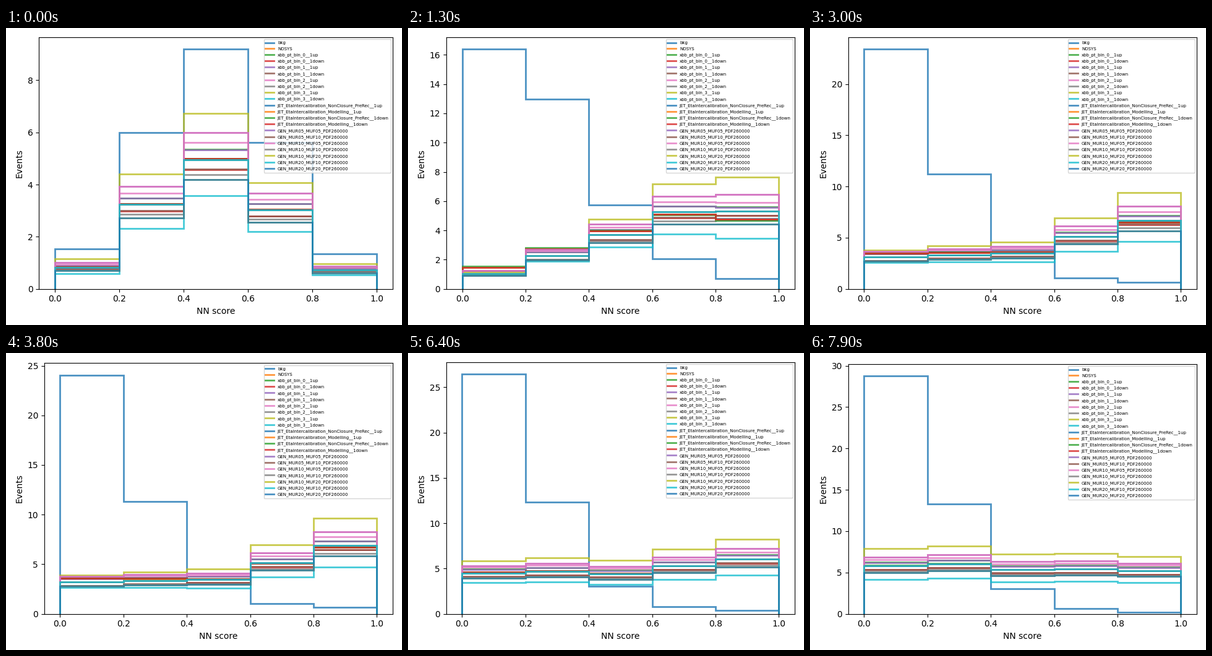
These frames come from a looping animation (640x480 px, 8 s). A matplotlib script:

```python
import numpy as np
import matplotlib.pyplot as plt
from matplotlib.animation import FuncAnimation

FRAMES, STEP_MS = 80, 100
EDGES = np.linspace(0, 1, 6)
POS = np.linspace(0, 1, 5)

LABELS = ["bkg", "NOSYS"]
LABELS += [f"xbb_pt_bin_{i}__1{d}" for i in range(4) for d in ("up", "down")]
LABELS += [f"JET_EtaIntercalibration_{n}__1{d}"
           for d in ("up", "down") for n in ("NonClosure_PreRec", "Modelling")]
SCALES = [("05", "05"), ("05", "10"), ("10", "05"), ("10", "10"),
          ("10", "20"), ("20", "10"), ("20", "20")]
LABELS += [f"GEN_MUR{r}_MUF{f}_PDF260000" for r, f in SCALES]

# Untrained network: background and signal share one bell
BELL = np.array([0.835, 3.24, 4.96, 3.03, 0.73])


def linear(u):
    return u


def ease_in(u):
    return u ** 1.5


def ease_out(u):
    return 1 - (1 - u) ** 2


# Key poses: start, background, signal, easing towards the next pose
POSES = [
    (0, 1.852 * BELL, BELL, linear),
    (13, (16.38, 12.95, 5.73, 2.05, 0.70), (1.06, 2.26, 3.70, 5.26, 5.30), linear),
    (22, (21.41, 10.98, 3.2, 1.2, 0.63), (2.77, 3.24, 3.62, 5.06, 6.17), ease_out),
    (38, (24.06, 11.33, 3.03, 1.03, 0.66), (3.21, 3.34, 3.46, 5.15, 6.9), ease_in),
    (79, (28.75, 13.3, 3.03, 0.64, 0.19), (5.8, 6.03, 5.36, 5.43, 5.2), linear),
]


def nominal(i):
    """Background and signal bin contents at frame i."""
    for a, b in zip(POSES, POSES[1:]):
        if i <= b[0]:
            u = a[3]((i - a[0]) / (b[0] - a[0]))
            return [(1 - u) * np.asarray(a[k]) + u * np.asarray(b[k]) for k in (1, 2)]


def histograms(i):
    bkg, sig = nominal(i)
    tilt = (sig[-1] - sig[0]) / (sig[-1] + sig[0])
    # hard: share of high-pt events; jet: shift towards low scores
    hard = 0.94 + 1.3 * tilt * (POS - 0.7)
    jet = 0.005 + tilt ** 2 * (0.86 - 1.7 * POS + 0.6 * POS ** 2)

    soft = 0.1 * (1 - hard)
    xbb_up = [0.075 + soft, 0.07 + soft, 0.128 + 0.6 * soft, 0.37 * hard]
    xbb_down = [0.075 + soft, 0.07 + soft, 0.115, 0.29 * hard]
    drift = 0.025 * i / FRAMES + 0.05 * (0.95 - hard)
    muf = {"05": 1.208 - drift, "10": 1, "20": 0.843 + drift}

    factors = [1]
    for up, down in zip(xbb_up, xbb_down):
        factors += [1 + up, 1 - down]
    factors += [1 + k * jet for k in (0.95, 0.98, 1.15, 1)]
    factors += [muf[f] for _, f in SCALES]
    return [bkg] + [sig * f for f in factors]


fig, ax = plt.subplots(figsize=(6.4, 4.8), dpi=100)
steps = [ax.stairs(v, EDGES, color=f"C{n % 10}", alpha=0.8, linewidth=2, label=name)
         for n, (v, name) in enumerate(zip(histograms(0), LABELS))]
ax.set_xlim(-0.05, 1.05)
ax.set_xlabel("NN score")
ax.set_ylabel("Events")
ax.legend(loc="upper right", fontsize=5)


def update(i):
    values = histograms(i)
    for step, v in zip(steps, values):
        step.set_data(v)
    ax.set_ylim(0, 1.05 * np.max(values))
    fig.tight_layout()
    return steps


anim = FuncAnimation(fig, update, frames=FRAMES, interval=STEP_MS,
                     repeat=True, repeat_delay=0)
plt.show()
```
